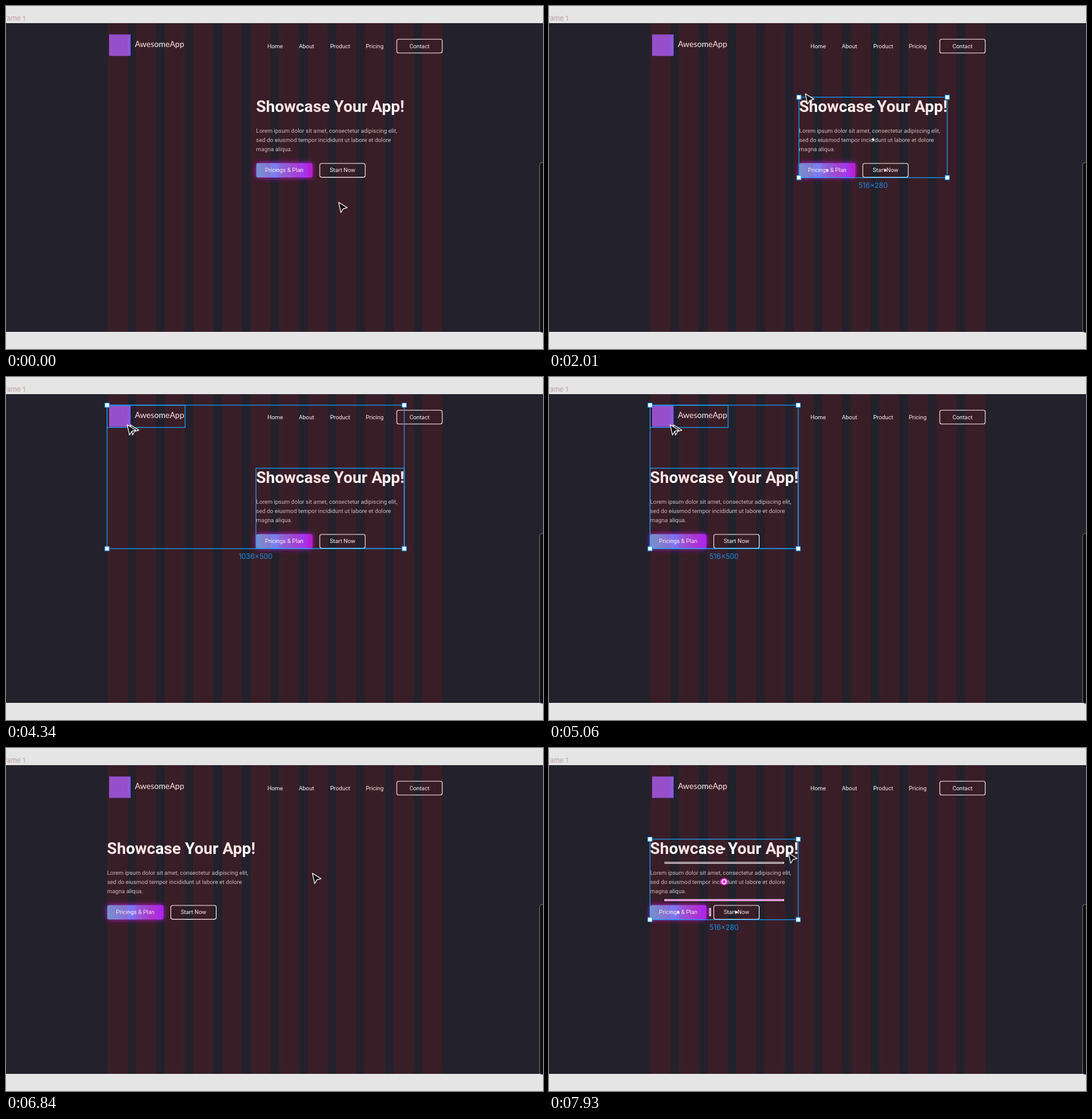
An HTML page for the animation above (8 s loop, 875x560 px).

```html
<!DOCTYPE html>
<html lang="en">
<head>
<meta charset="utf-8">
<title>Align left</title>
<style>
  html, body { margin: 0; width: 100%; height: 100%; overflow: hidden; background: #e5e5e5; }
  svg { display: block; width: 100vw; height: 100vh; }
  text { font: 9.375px Roboto, sans-serif; fill: #fff; }
  .mid { text-anchor: middle; }
  .title { font-size: 26.25px; font-weight: 700; }
  .body { fill: #cbc8cd; }
  .brand { font: 13.2px Lato, sans-serif; }
  .tab { font: 11px Inter, sans-serif; fill: #bd9f9f; text-anchor: end; }
  .size { font: 11.5px Inter, sans-serif; fill: #1890e2; text-anchor: middle; }
  .outline { fill: none; stroke: #fff; stroke-width: 1.1; }
  .thin { fill: none; stroke: #18a0fb; stroke-width: 1.2; }
  .thick { fill: none; stroke: #18a0fb; stroke-width: 2.2; }
  .handle { fill: #fff; stroke: #18a0fb; stroke-width: 1; }
  .bar { fill: #e01fd0; stroke: #fff; stroke-width: 1; }
  .arrow { fill: #0c0c10; stroke: #fff; stroke-width: 1.2; stroke-linejoin: round; }
</style>
</head>
<body>
<svg id="stage" viewBox="0 0 875 560" xmlns="http://www.w3.org/2000/svg"></svg>
<script>
const LOOP = 8000, ALIGN = 5060, SHIFT = -242.8;
const HERO = { x: 407.3, y: 148.9, w: 241.6, h: 131.4 };
const LOGO = { x: 164.6, y: 46, w: 127.2, h: 36.4 };
const stage = document.getElementById('stage');
const $ = id => document.getElementById(id);

const rect = (cls, x, y, w, h, more = '') =>
  `<rect class="${cls}" x="${x}" y="${y}" width="${w}" height="${h}" ${more}/>`;
const box = (cls, b, id = '') => rect(cls, b.x, b.y, b.w, b.h, id && `id="${id}"`);
const text = (cls, x, y, s) => `<text class="${cls}" x="${x}" y="${y}">${s}</text>`;
const group = (id, s) => `<g id="${id}">${s}</g>`;
const dot = (x, y) => `<circle cx="${x}" cy="${y}" r="1.9" fill="#fff"/>`;

const columns = () => Array.from({ length: 12 }, (_, i) =>
  rect('', 165.2 + i * 46.63, 28, 32.8, 504, 'fill="#f00" opacity=".1"')).join('');

// Bounds with corner handles and a size label below
function selection(b, label) {
  const corners = [[0, 0], [1, 0], [0, 1], [1, 1]].map(([u, v]) =>
    rect('handle', b.x + u * b.w - 3.5, b.y + v * b.h - 3.5, 7, 7)).join('');
  return box('thin', b) + corners + text('size', b.x + b.w / 2, b.y + b.h + 16.8, label);
}

// Bounds around the logo and the hero, whose left edge is heroX
function pair(heroX, label) {
  const union = { x: LOGO.x, y: LOGO.y, w: heroX + HERO.w - LOGO.x, h: HERO.y + HERO.h - LOGO.y };
  return box('thin', LOGO) + box('thin', { ...HERO, x: heroX }) + selection(union, label);
}

const arrow = (id, dx) =>
  `<path id="${id}" class="arrow" d="M${dx + .5} .5L${dx + 14.5} 9.3L${dx + 7.8} 11.2L${dx + 4.2} 17.3Z"/>`;

const nav = [['Home', 426], ['About', 477.2], ['Product', 528.2], ['Pricing', 586.2]];
const copy = [
  'Lorem ipsum dolor sit amet, consectetur adipiscing elit,',
  'sed do eiusmod tempor incididunt ut labore et dolore',
  'magna aliqua.'
];

const hero =
  text('title', 407.4, 173.4, 'Showcase Your App!') +
  copy.map((line, i) => text('body', 407.6, 206.5 + i * 15, line)).join('') +
  rect('', 407.8, 256.6, 91.6, 23.4, 'rx="3" fill="#b01ee6" filter="url(#glow)"') +
  rect('', 407.8, 256.6, 91.6, 23.4, 'rx="3" fill="url(#fade)"') +
  text('mid', 453.4, 271.2, 'Pricings &amp; Plan') +
  rect('outline', 511.3, 257, 74, 22.6, 'rx="3"') +
  text('mid', 548.3, 271.2, 'Start Now');

const dots = dot(528.2, 164.5) + dot(528.2, 218.2) + dot(453.4, 268.2) + dot(548.3, 268.2);
const spacing =
  rect('bar', 431.3, 186.5, 194, 2, 'style="fill:#4a2438"') +
  rect('bar', 431.3, 247.3, 194, 2) +
  rect('bar', 504.1, 262, 2.2, 12) +
  '<circle cx="528.2" cy="218.2" r="5" fill="#fff" stroke="#f032dc" stroke-width="2"/>' +
  '<circle cx="528.2" cy="218.2" r="2.6" fill="#f032dc"/>';

stage.innerHTML = `
  <defs>
    <linearGradient id="fade">
      <stop offset="0" stop-color="#68a0e6"/>
      <stop offset=".45" stop-color="#8070f0"/>
      <stop offset="1" stop-color="#b41ee8"/>
    </linearGradient>
    <filter id="glow" x="-30%" y="-100%" width="160%" height="300%">
      <feGaussianBlur stdDeviation="4"/>
    </filter>
  </defs>` +
  rect('', 0, 0, 875, 560, 'fill="#e5e5e5"') +
  text('tab', 31.5, 24, 'Frame 1') +
  rect('', 0, 28, 875, 504, 'fill="#22212c"') +
  rect('', 168, 46.5, 35, 35, 'fill="#8a58e2"') +
  text('brand', 210, 67.4, 'AwesomeApp') +
  nav.map(([s, x]) => text('', x, 69, s)).join('') +
  rect('outline', 636.8, 54.3, 74, 22.4, 'rx="3"') +
  text('mid', 673.8, 68.6, 'Contact') +
  group('hero', hero) +
  columns() +
  rect('', 869.5, 255.5, 20, 277.5, 'rx="4" fill="#0e0e12" stroke="#77767c"') +
  box('thick', LOGO, 'logoHover') +
  group('heroTools',
    box('thick', HERO, 'heroHover') +
    group('heroSel', selection(HERO, '516×280') + dots + group('spacing', spacing))) +
  group('pairWide', pair(HERO.x, '1036×500')) +
  group('pairNarrow', pair(HERO.x + SHIFT, '516×500')) +
  group('cursor', arrow('twin', 5) + arrow('main', 0));

// Pointer moves: first change, last change, steps, target x, y
const START = [541.5, 320];
const MOVES = [
  [150, 610, 7, 530.5, 170.5],
  [760, 920, 3, 529.7, 168.8],
  [1700, 2490, 10, 210, 95],
  [2550, 2790, 4, 197, 77.5],
  [6050, 6290, 4, 389.7, 168.5],
  [6370, 6600, 4, 498.8, 204],
  [7240, 7620, 6, 389.7, 171]
];
const ease = u => u * u * (3 - 2 * u);

function pointer(t) {
  let [x, y] = START;
  for (const [from, to, n, tx, ty] of MOVES) {
    if (t < from) break;
    const step = Math.floor((t - from) / (to - from) * (n - 1) + 1e-6);
    const u = ease(Math.min(1, (step + 1) / n));
    x += (tx - x) * u;
    y += (ty - y) * u;
  }
  return [x, y];
}

const show = (id, on) => $(id).setAttribute('visibility', on ? 'inherit' : 'hidden');
const within = (t, a, b) => t >= a && t < b;

function render(t) {
  const [x, y] = pointer(t);
  const dx = t >= ALIGN ? SHIFT : 0;
  const over = (b, off = 0) =>
    x >= b.x + off && x <= b.x + off + b.w && y >= b.y && y <= b.y + b.h;
  const move = `translate(${dx} 0)`;
  $('hero').setAttribute('transform', move);
  $('heroTools').setAttribute('transform', move);
  $('cursor').setAttribute('transform', `translate(${x} ${y})`);

  const picked = within(t, 1700, 3100) || t >= 7700;
  const settled = within(t, 1850, 3100) || t >= 7850;
  const both = within(t, 3100, 6750) && !within(t, 6290, 6370);
  show('heroHover', (t < 1700 || within(t, 7240, 7700)) && over(HERO, dx));
  show('logoHover', within(t, 2550, 3170) && over(LOGO));
  show('heroSel', picked);
  show('spacing', settled && over(HERO, dx));
  show('pairWide', both && t < ALIGN);
  show('pairNarrow', both && t >= ALIGN);
  show('twin', within(t, 4340, 5740));
}

let begin;
function tick(now) {
  begin ??= now;
  render((now - begin) % LOOP);
  requestAnimationFrame(tick);
}
render(0);
requestAnimationFrame(tick);
</script>
</body>
</html>
```
